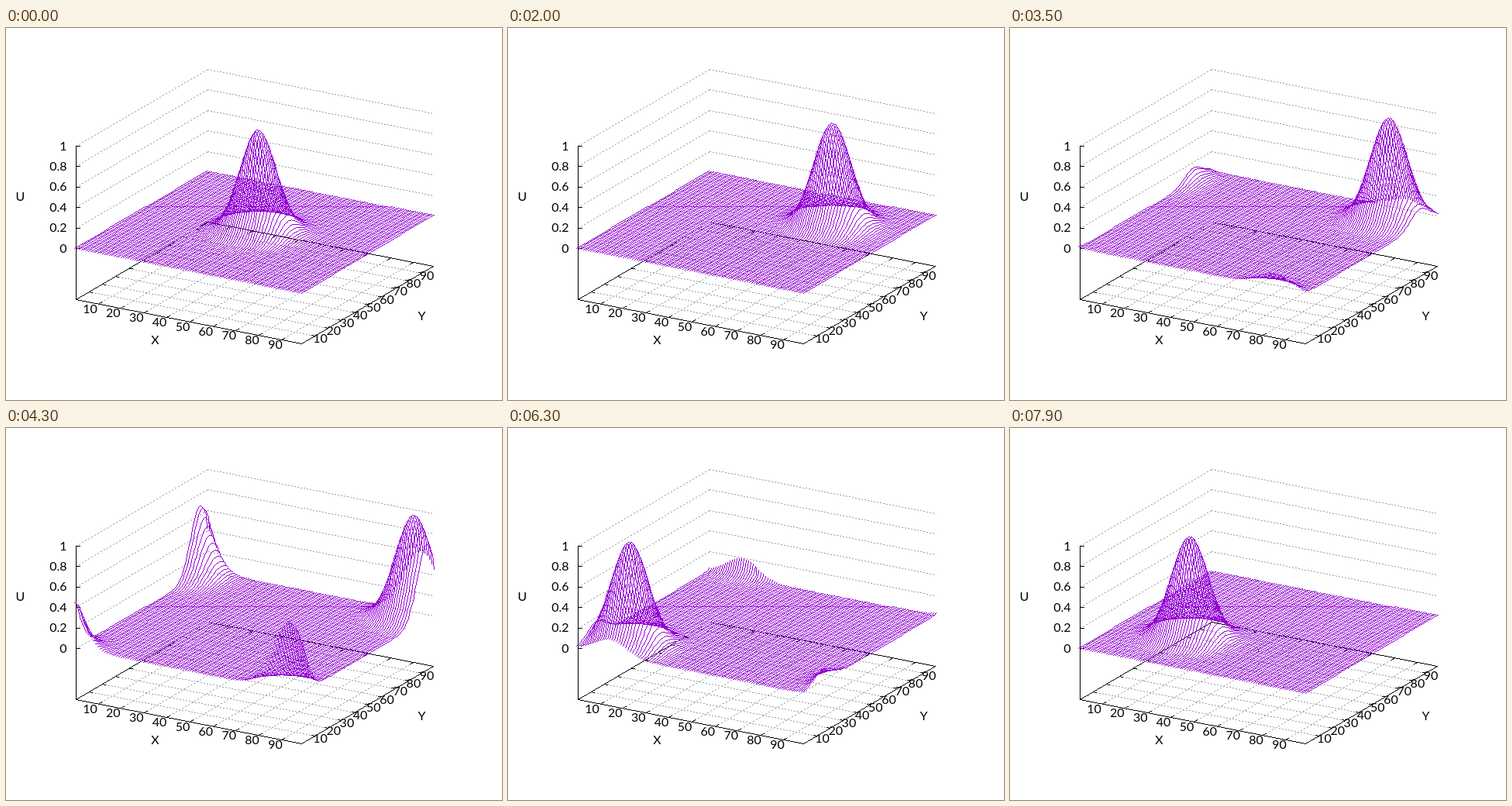
An HTML page with a canvas that plays this animation: 640 by 480 pixels, repeating every 8 s.

```html
<!DOCTYPE html>
<html lang="en">
<head>
<meta charset="utf-8">
<title>Travelling pulse on a periodic plane</title>
<style>
  html, body { margin: 0; width: 100%; height: 100%; overflow: hidden; background: #fff; }
  canvas, svg { position: absolute; left: 0; top: 0; }
  text { font: 16px Lato, sans-serif; text-anchor: middle; }
</style>
</head>
<body>
<canvas id="plot" width="640" height="480"></canvas>
<svg id="labels" width="640" height="480"></svg>
<script>
const W = 640, H = 480;
const BLACK = 0xff000000, GRAY = 0xffa0a0a0, PURPLE = 0xffd30094; // ABGR
const ctx = document.getElementById('plot').getContext('2d');
const image = ctx.createImageData(W, H);
const pixels = new Uint32Array(image.data.buffer);

// One pixel wide line without smoothing; dotted lines are two on, two off.
function line(x0, y0, x1, y1, color, dotted) {
  x0 = Math.round(x0); y0 = Math.round(y0);
  x1 = Math.round(x1); y1 = Math.round(y1);
  const dx = Math.abs(x1 - x0), dy = -Math.abs(y1 - y0);
  const sx = x0 < x1 ? 1 : -1, sy = y0 < y1 ? 1 : -1;
  let err = dx + dy;
  for (let i = 0; ; i++) {
    if (!dotted || i % 4 < 2) pixels[y0 * W + x0] = color;
    if (x0 === x1 && y0 === y1) return;
    const e = 2 * err;
    if (e >= dy) { err += dy; x0 += sx; }
    if (e <= dx) { err += dx; y0 += sy; }
  }
}

function label(str, x, y, anchor) {
  const el = document.createElementNS('http://www.w3.org/2000/svg', 'text');
  el.textContent = str;
  el.setAttribute('x', x);
  el.setAttribute('y', y + 5.5);
  if (anchor) el.style.textAnchor = anchor;
  document.getElementById('labels').append(el);
}

// Floor of the box, with both axes running from 0 to 1.
const floor = (a, b) => [90 + 291 * a + 170 * b, 350 + 57 * a - 100 * b];
const floorLine = (a0, b0, a1, b1, color, dotted) =>
  line(...floor(a0, b0), ...floor(a1, b1), color, dotted);

function drawBox() {
  pixels.fill(0xffffffff);
  for (let i = 0; i <= 5; i++) {
    const y = 284 - 26.4 * i;
    line(90, y, 260, y - 99, GRAY, true);
    line(260, y - 99, 551, y - 42, GRAY, true);
  }
  const ticks = Array.from({ length: 9 }, (_, i) => (10 * i + 9.7) / 98.4);
  for (const f of ticks) {
    floorLine(f, 0, f, 1, GRAY, true);
    floorLine(0, f, 1, f, GRAY, true);
  }
  for (const f of ticks) {
    floorLine(f, 0, f, .024, BLACK);
    floorLine(f, 1, f, .976, BLACK);
    floorLine(0, f, .014, f, BLACK);
    floorLine(1, f, .986, f, BLACK);
  }
  floorLine(0, 0, 1, 0, BLACK);
  floorLine(1, 0, 1, 1, BLACK);
  floorLine(0, 0, 0, 1, BLACK);
  floorLine(0, 1, 1, 1, BLACK);
  line(90, 152, 90, 350, BLACK);
  for (let i = 0; i <= 5; i++) line(90, 284 - 26.4 * i, 95, 284 - 26.4 * i, BLACK);
}

function drawLabels() {
  for (let i = 0; i <= 5; i++) label(i / 5, 78.5, 284 - 26.4 * i, 'end');
  for (let i = 0; i < 9; i++) {
    label(10 * i + 10, 108.5 + 29.87 * i, 362 + 5.8 * i);
    label(10 * i + 10, 405.5 + 17.2 * i, 400.5 - 10.1 * i);
  }
  label('X', 192.5, 402);
  label('Y', 536.5, 371);
  label('U', 18.5, 217);
}

const PERIOD = 99, SPREAD = 100;

// Periodic bell along one axis.
function bell(i, center) {
  let d = Math.abs(i - center) % PERIOD;
  d = Math.min(d, PERIOD - d);
  return Math.exp(-d * d / SPREAD);
}

// The first and last cells trail behind the moving pulse.
function profile(center, firstLag, lastLag) {
  return Array.from({ length: PERIOD + 1 }, (_, i) =>
    bell(i, center - (i === 0 ? firstLag : i === PERIOD ? lastLag : 0)));
}

function drawSurface(step) {
  const center = 50.5 + step;
  const gx = profile(center, .75, 0);
  const gy = profile(center, .75, 1.5);
  for (let i = 0; i <= PERIOD; i++) {
    const a = 2 * i / PERIOD - 1;
    let px, py;
    for (let j = 0; j <= PERIOD; j++) {
      const b = 2 * j / PERIOD - 1;
      // Coordinates are cut towards the middle of the stage.
      const x = 320 + Math.trunc(146.6 * a + 85.4 * b);
      const y = 230 + Math.trunc(33 + 29 * a - 50.5 * b - 132 * gx[i] * gy[j]);
      if (j) line(px, py, x, y, PURPLE);
      px = x; py = y;
    }
  }
}

drawBox();
drawLabels();
const box = pixels.slice();
let shown = -1;

function frame() {
  const step = Math.floor(performance.now() % 8000 / 100);
  if (step !== shown) {
    shown = step;
    pixels.set(box);
    drawSurface(step);
    ctx.putImageData(image, 0, 0);
  }
  requestAnimationFrame(frame);
}
frame();
</script>
</body>
</html>
```
